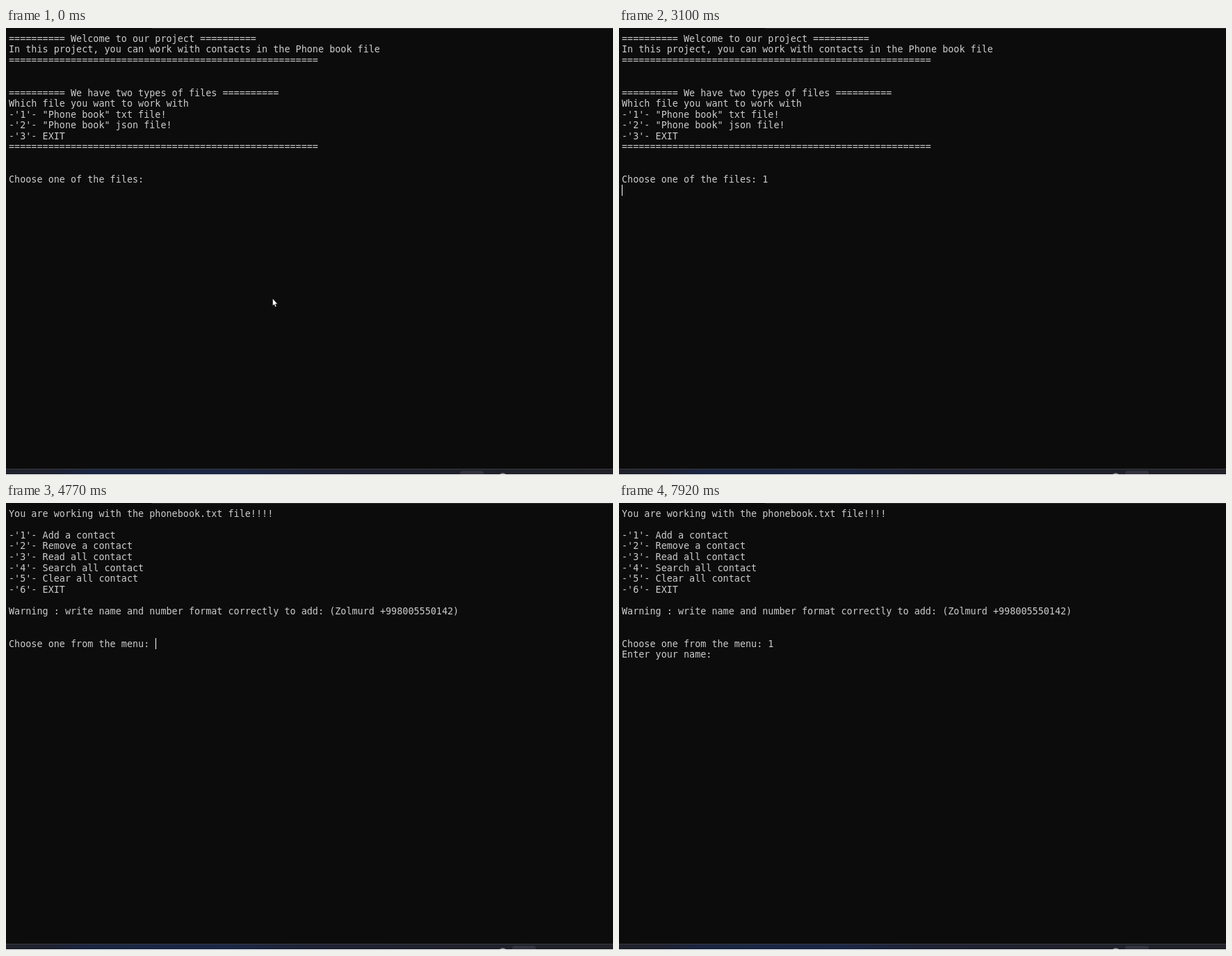
Animation, 873 px wide and 642 px high, one loop 8000 ms. Source, as an HTML page:

```html
<!DOCTYPE html>
<html lang="en">
<head>
<meta charset="utf-8">
<title>Phone book terminal</title>
<style>
  html, body { margin: 0; width: 100%; height: 100%; overflow: hidden; background: #0c0c0c; }
  #stage { position: relative; width: 873px; height: 642px; overflow: hidden; background: #0c0c0c; }
  #stage > * { position: absolute; }

  pre {
    left: 4px; top: 7.8px; margin: 0;
    font: 13.45px/15.57px "DejaVu Sans Mono", "Noto Sans Mono", monospace;
    font-variant-ligatures: none;
    color: #ccc;
  }
  .caret { width: 1px; height: 15px; background: #fff; }
  .edge { left: 210px; right: 0; top: 0; height: 1px; background: #2b2b2b; }

  .bar {
    left: 0; top: 633px; width: 873px; height: 8px; overflow: hidden;
    background: linear-gradient(90deg, #20212a 0, #1e2130 60px, #1a2542 120px, #1b2745 320px, #1e2234 440px, #20212c 640px, #212128 100%);
    box-shadow: inset 0 1px #3b3b45;
  }
  .bar i { position: absolute; }
  .pill { top: 3px; width: 34px; height: 12px; border-radius: 4px; background: #33343e; }
  .dot { left: 709px; top: 6px; width: 11px; height: 11px; border-radius: 50%; background: #85868c; }
  .foot { left: 0; top: 641px; width: 100%; height: 1px; background: #fff; }

  /* Hard cuts on one shared 8 s clock: 1% = 80 ms */
  .cut { opacity: 0; animation: 8s step-end infinite; }
  .files  { animation-name: files; }
  .pick   { animation-name: pick; }
  .menu   { animation-name: menu; }
  .choice { animation-name: choice; }
  .ask    { animation-name: ask; }
  .c1 { left: 207px; top: 210px; animation-name: c1; }
  .c2 { left: 215px; top: 210px; animation-name: c2; }
  .c3 { left: 4px;   top: 225px; height: 16px; animation-name: c3; }
  .c4 { left: 215px; top: 194px; height: 16px; animation-name: c4; }
  .c5 { left: 223px; top: 194px; height: 16px; animation-name: c5; }
  .c6 { left: 142px; top: 210px; animation-name: c6; }
  .mouse { left: 383px; top: 388px; animation-name: mouse; }
  .from { left: 653px; animation-name: from; }
  .to   { left: 728px; animation-name: to; }

  @keyframes files  { 0% { opacity: 1 } 43.75%, 100% { opacity: 0 } }
  @keyframes pick   { 0% { opacity: 0 } 36.25%, 100% { opacity: 1 } }
  @keyframes menu   { 0% { opacity: 0 } 44.875%, 100% { opacity: 1 } }
  @keyframes choice { 0% { opacity: 0 } 74.5%, 100% { opacity: 1 } }
  @keyframes ask    { 0% { opacity: 0 } 77.625%, 100% { opacity: 1 } }
  @keyframes c1 {
    0%, 8.25%, 21.375%, 36.25%, 100% { opacity: 0 }
    .875%, 15.375%, 29.25% { opacity: 1 }
  }
  @keyframes c2 { 0%, 38.75%, 100% { opacity: 0 } 36.25% { opacity: 1 } }
  @keyframes c3 { 0%, 44.875%, 100% { opacity: 0 } 38.75% { opacity: 1 } }
  @keyframes c4 {
    0%, 53.25%, 67.125%, 100% { opacity: 0 }
    44.875%, 59.625% { opacity: 1 }
  }
  @keyframes c5 { 0%, 77.625%, 100% { opacity: 0 } 74.5% { opacity: 1 } }
  @keyframes c6 {
    0%, 85.75%, 99%, 100% { opacity: 0 }
    77.625%, 92.25% { opacity: 1 }
  }
  @keyframes mouse { 0% { opacity: 1 } .875%, 100% { opacity: 0 } }
  @keyframes from { 0% { opacity: 1 } .875% { opacity: .5 } 2.5%, 100% { opacity: 0 } }
  @keyframes to { 0% { opacity: 0 } 2.5% { opacity: .5 } 4.125%, 100% { opacity: 1 } }
</style>
</head>
<body>
<div id="stage">
  <div class="edge"></div>

<pre class="cut files">========== Welcome to our project ==========
In this project, you can work with contacts in the Phone book file
=======================================================


========== We have two types of files ==========
Which file you want to work with
-'1'- "Phone book" txt file!
-'2'- "Phone book" json file!
-'3'- EXIT
=======================================================


Choose one of the files: <span class="cut pick">1</span></pre>

<pre class="cut menu">You are working with the phonebook.txt file!!!!

-'1'- Add a contact
-'2'- Remove a contact
-'3'- Read all contact
-'4'- Search all contact
-'5'- Clear all contact
-'6'- EXIT

Warning : write name and number format correctly to add: (Zolmurd +998005550142)


Choose one from the menu: <span class="cut choice">1</span>
<span class="cut ask">Enter your name:</span></pre>

  <div class="caret cut c1"></div>
  <div class="caret cut c2"></div>
  <div class="caret cut c3"></div>
  <div class="caret cut c4"></div>
  <div class="caret cut c5"></div>
  <div class="caret cut c6"></div>

  <svg class="cut mouse" width="10" height="15" viewBox="0 0 10 15">
    <path d="M.5 .5V11L2.8 9L4.3 12.8L6 12.1L4.5 8.4H7.6Z" fill="#fff" stroke="#000" stroke-width=".5"/>
  </svg>

  <div class="bar">
    <i class="pill cut from"></i>
    <i class="pill cut to"></i>
    <i class="dot"></i>
  </div>
  <div class="foot"></div>
</div>
</body>
</html>
```
